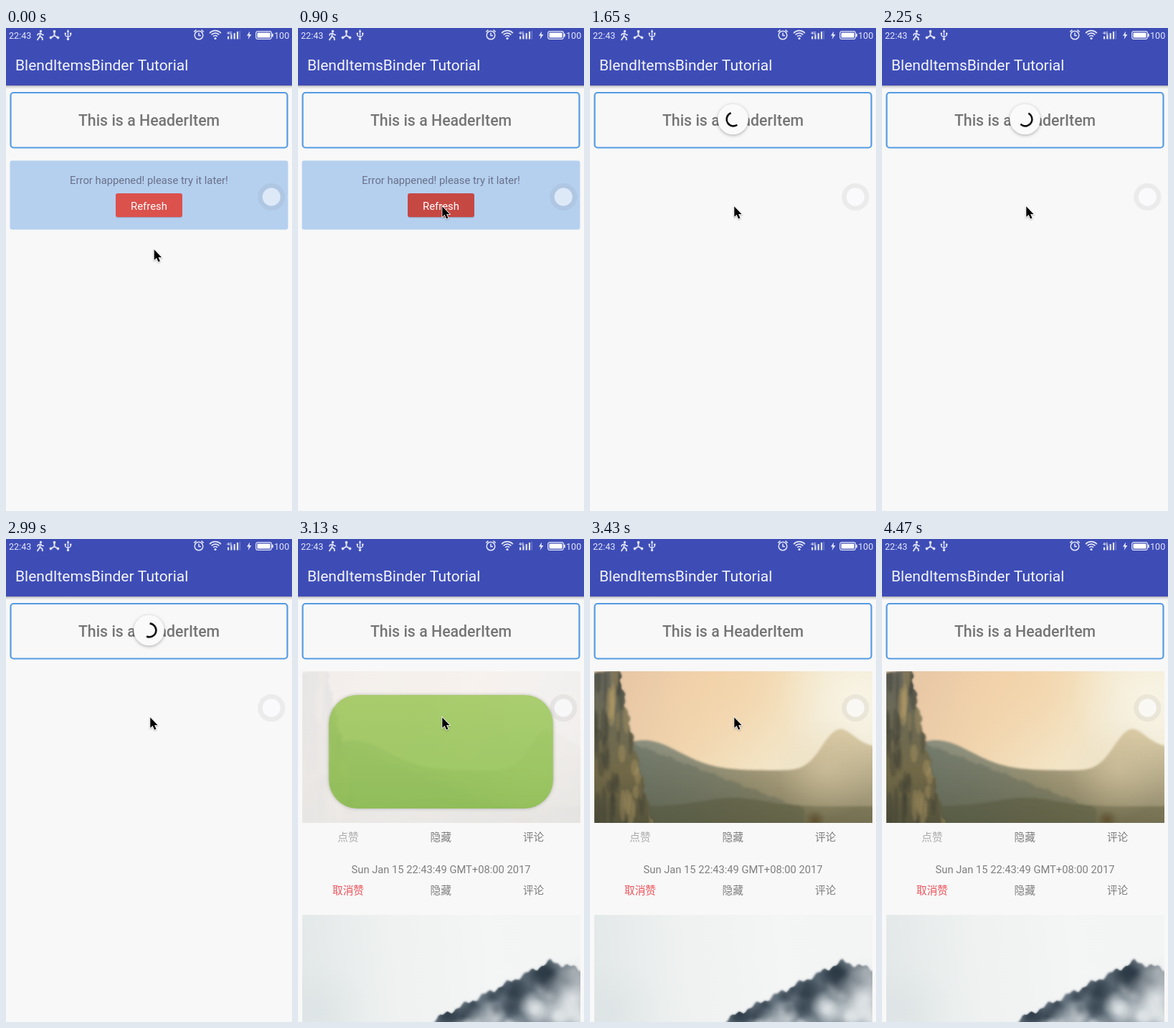
Recreate the animation shown at these times as an HTML page with a canvas. Size 399 px wide and 672 px high, loop 4920 ms.

```html
<!DOCTYPE html>
<html lang="en">
<head>
<meta charset="utf-8">
<title>List tutorial</title>
<style>
  html, body { margin: 0; width: 100%; height: 100%; overflow: hidden; background: #f8f8f8; }
  canvas { display: block; }
</style>
</head>
<body>
<canvas id="stage" width="399" height="672"></canvas>
<script>
let ctx = document.getElementById('stage').getContext('2d');
const LOOP = 4920, STEP = 149;
const ROBOTO = 'Roboto, sans-serif';
const CJK = '"Noto Sans CJK SC", "Noto Sans CJK", sans-serif';
const ICON = '#e3e6f6';

const clamp = v => Math.max(0, Math.min(1, v));
const easeInOut = v => 0.5 - Math.cos(clamp(v) * Math.PI) / 2;
const bump = (x, center, width) => Math.exp(-(((x - center) / width) ** 2));
const rough = x => 2.5 * Math.sin(x * 0.21) + 1.8 * Math.sin(x * 0.53 + 1);

// Cubic bezier (0.4, 0, 0.2, 1)
function fastOutSlowIn(x) {
  let lo = 0, hi = 1;
  for (let i = 0; i < 20; i++) {
    const s = (lo + hi) / 2, r = 1 - s;
    if (1.2 * r * r * s + 0.6 * r * s * s + s ** 3 < x) lo = s; else hi = s;
  }
  return 3 * (1 - lo) * lo * lo + lo ** 3;
}

function seeded(seed) {
  return () => (seed = (seed * 16807) % 2147483647) / 2147483647;
}

function text(str, x, y, size, color, { align = 'center', weight = 400, family = ROBOTO } = {}) {
  ctx.font = `${weight} ${size}px ${family}`;
  ctx.textAlign = align;
  ctx.fillStyle = color;
  ctx.fillText(str, x, y);
}

function rect(x, y, w, h, color, radius = 0) {
  ctx.beginPath();
  ctx.roundRect(x, y, w, h, radius);
  ctx.fillStyle = color;
  ctx.fill();
}

function frameRect(x, y, w, h, color, radius, width) {
  ctx.beginPath();
  ctx.roundRect(x, y, w, h, radius);
  ctx.lineWidth = width;
  ctx.strokeStyle = color;
  ctx.stroke();
}

function oval(x, y, rx, ry, color) {
  ctx.beginPath();
  ctx.ellipse(x, y, rx, ry, 0, 0, 7);
  ctx.fillStyle = color;
  ctx.fill();
}

const disc = (x, y, r, color) => oval(x, y, r, r, color);

function stroke(path, width = 1.5) {
  ctx.lineWidth = width;
  ctx.strokeStyle = ICON;
  ctx.stroke(new Path2D(path));
}

function arc(x, y, r, from, to, width, color = ICON) {
  ctx.beginPath();
  ctx.arc(x, y, r, from, to);
  ctx.lineWidth = width;
  ctx.strokeStyle = color;
  ctx.stroke();
}

function linear(x0, y0, x1, y1, ...colors) {
  const g = ctx.createLinearGradient(x0, y0, x1, y1);
  colors.forEach((c, i) => g.addColorStop(i / (colors.length - 1), c));
  return g;
}

function glow(x, y, r, rgb, alpha) {
  const g = ctx.createRadialGradient(x, y, 0, x, y, r);
  g.addColorStop(0, `rgba(${rgb},${alpha})`);
  g.addColorStop(1, `rgba(${rgb},0)`);
  ctx.fillStyle = g;
  ctx.fillRect(x - r, y - r, 2 * r, 2 * r);
}

// Region below the curve y = top(x)
function ridge(top, from = 0, to = 399, bottom = 680) {
  const path = new Path2D();
  path.moveTo(from, bottom);
  for (let x = from; x <= to; x += 3) path.lineTo(x, top(x));
  path.lineTo(to, bottom);
  return path;
}

function fill(path, color) {
  ctx.fillStyle = color;
  ctx.fill(path);
}

// Paints a picture once; its drawing code uses stage coordinates.
function picture(y, height, paint) {
  const canvas = document.createElement('canvas');
  canvas.width = 388;
  canvas.height = height;
  const stage = ctx;
  ctx = canvas.getContext('2d');
  ctx.translate(-5.5, -y);
  paint();
  ctx = stage;
  return alpha => {
    ctx.globalAlpha = alpha;
    ctx.drawImage(canvas, 5.5, y);
    ctx.globalAlpha = 1;
  };
}

const placeholder = picture(184, 211, () => {
  rect(0, 180, 399, 220, linear(5, 184, 394, 395, '#f4f2f1', '#f7f4f3', '#eeeded'));
  ctx.shadowColor = 'rgba(0,0,0,.25)';
  ctx.shadowBlur = 5;
  rect(43, 217, 313, 158, linear(0, 217, 0, 375, '#a4cc69', '#95c45c'), 40);
});

const valley = picture(184, 211, () => {
  const random = seeded(7);
  rect(0, 180, 399, 220, linear(60, 184, 350, 310, '#e9c8a6', '#f1d5ae', '#f3e4c4', '#efe8d4'));
  glow(210, 205, 120, '245,206,160', 0.4);
  glow(375, 225, 110, '252,249,236', 0.75);
  ctx.filter = 'blur(1.5px)';

  const hills = x => 322 - 42 * bump(x, 75, 70) - 50 * bump(x, 345, 32) - 30 * bump(x, 400, 45);
  const range = ridge(hills);
  fill(range, linear(60, 0, 394, 0, '#8d9181', '#9b9b86', '#b5aa88', '#d3c39d', '#dccda9'));
  fill(range, linear(0, 270, 0, 395, 'rgba(70,72,50,0)', 'rgba(75,76,50,.55)'));
  fill(ridge(x => 262 + x * 0.38 + rough(x) / 2, 50, 300), 'rgba(78,90,78,.32)');
  fill(ridge(x => 372 - 12 * bump(x, 200, 60)), 'rgba(82,80,52,.4)');
  glow(330, 320, 70, '235,218,180', 0.35);
  glow(314, 391, 14, '90,72,40', 0.8);

  // Cliff with weathered streaks
  const edge = y => 41 + 46 * Math.max(0, (y - 184) / 211) ** 1.1 + rough(y) * 0.7;
  const cliff = new Path2D('M0 187 L30 183');
  for (let y = 184; y < 404; y += 4) cliff.lineTo(edge(y), y);
  cliff.lineTo(0, 404);
  fill(cliff, linear(0, 184, 0, 395, '#64645a', '#6d6a54', '#716847', '#55533c'));
  ctx.clip(cliff);
  for (let i = 0; i < 46; i++) {
    const y = 184 + random() * 211, x = random() * edge(y);
    const sunny = x > edge(y) * 0.5 && random() < 0.65;
    oval(x, y, 2 + random() * 4, 8 + random() * 20, sunny ? 'rgba(176,153,101,.4)' : 'rgba(50,54,46,.32)');
  }
});

const cloudyPeak = picture(523, 149, () => {
  const random = seeded(19);
  rect(0, 518, 399, 160, linear(5, 600, 394, 560, '#e3e8e8', '#eff2f1', '#f4f5f5', '#f3f4f4'));
  glow(30, 655, 70, '216,224,226', 0.5);
  ctx.filter = 'blur(1.5px)';

  const slope = x => 588 + (x < 352 ? 0.5 : -0.25) * (352 - x) + rough(x);
  const peak = ridge(slope, 190);
  ctx.save();
  fill(peak, linear(200, 672, 394, 600, '#6b7984', '#62707c', '#56646f', '#7d8890'));
  ctx.clip(peak);
  for (let i = 0; i < 60; i++) {
    const x = 195 + random() * 200, depth = random() * 75;
    const cloudy = depth > 18 + random() * 30;
    glow(x, slope(x) + depth, 8 + random() * 14, cloudy ? '226,231,233' : '42,56,68', 0.65);
  }
  ctx.restore();
  glow(384, 640, 48, '232,236,238', 0.9);
  glow(340, 658, 34, '222,228,231', 0.75);
  glow(384, 600, 20, '238,241,242', 0.5);
});

function statusBar() {
  const left = { align: 'left' };
  text('22:43', 4, 14.5, 12.6, ICON, left);
  text('100', 374, 14.5, 12.6, ICON, left);

  // Walker
  disc(48.5, 4.4, 1.7, ICON);
  stroke('M43.5 10.5 L45 8 L48.5 7 L50.5 9.5 H53');
  stroke('M47.8 7 L47.3 11.5 L50.5 13.5 L51 17 M47.3 11.5 L43.5 17', 1.9);

  // Hub
  for (let i = 0; i < 3; i++) {
    ctx.save();
    ctx.translate(67.5, 10.5);
    ctx.rotate(i * Math.PI * 2 / 3);
    stroke('M0 0 V-6', 1.9);
    rect(-1.7, -7.5, 3.4, 3.4, ICON, 1);
    ctx.restore();
  }

  // USB
  stroke('M86.5 3 V16 M82.8 7.5 V10.5 L86.5 13 L90.2 10.5 V7.5', 1.3);
  fill(new Path2D('M84.6 5.4 L86.5 2 L88.4 5.4'), ICON);
  disc(86.5, 15.5, 1.7, ICON);
  disc(82.8, 7.8, 1.3, ICON);
  rect(89, 6.6, 2.4, 2.4, ICON);

  // Alarm
  arc(269, 10, 5.8, 0, 7, 1.5);
  stroke('M269 6.5 V10.5 H272 M262.3 5.3 L265.5 2.7 M275.7 5.3 L272.5 2.7');

  // Wi-Fi
  for (let r = 4; r < 12; r += 3.4) arc(292, 14.5, r, -Math.PI * 0.76, -Math.PI * 0.24, 1.7);
  disc(292, 14.5, 1.6, ICON);

  // Signal, charging bolt and battery
  text('4G', 308, 8.5, 6, ICON, { align: 'left', weight: 700 });
  for (let i = 0; i < 4; i++) rect(309 + i * 4.3, 11.5 - i * 2.2, 2.2, 4 + i * 2.2, ICON);
  rect(325.5, 4, 1.5, 11.5, 'rgba(227,230,246,.3)');
  fill(new Path2D('M340 4.5 L336 10.7 H338.6 L337.7 15.7 L342.4 9 H339.7'), ICON);
  frameRect(348.7, 4.7, 21.6, 10.6, ICON, 2.5, 1.2);
  rect(350.5, 6.5, 18, 7, '#fff', 1);
  rect(371, 7.5, 1.8, 5, ICON, 1);
}

function appBar() {
  rect(0, 80, 399, 5, linear(0, 80, 0, 85, 'rgba(0,0,0,.28)', 'rgba(0,0,0,.09)', 'rgba(0,0,0,0)'));
  rect(0, 0, 399, 80, '#3e4db6');
  statusBar();
  text('BlendItemsBinder Tutorial', 13, 59, 21, '#f4f5fc', { align: 'left' });
}

function header() {
  frameRect(6.5, 90, 386, 76.5, '#559be3', 4, 2.2);
  text('This is a HeaderItem', 199.5, 136, 21.3, '#757575', { weight: 500 });
}

function errorCard(alpha, pressed) {
  ctx.globalAlpha = alpha;
  rect(5.5, 184.5, 388, 96, '#b5d0ef', 3);
  text('Error happened! please try it later!', 199.5, 217, 14.8, '#697089');
  rect(153, 231, 93, 33.3, 'rgba(70,60,90,.25)', 3);
  rect(153, 230, 93, 33, pressed ? '#c64843' : '#db514c', 3);
  text('Refresh', 199.5, 252.5, 14.9, '#fff');
  ctx.globalAlpha = 1;
}

function actions(y, like, likeColor) {
  const labels = [like, '隐藏', '评论'];
  labels.forEach((label, i) =>
    text(label, 70 + i * 129.3, y, 14.7, i ? '#7d7d7d' : likeColor, { family: CJK }));
}

function list(photoAlpha) {
  placeholder(1);
  valley(photoAlpha);
  actions(419.5, '点赞', '#ababab');
  text('Sun Jan 15 22:43:49 GMT+08:00 2017', 199.5, 465, 14.7, '#7f7f7f');
  actions(493.5, '取消赞', '#ee535b');
  cloudyPeak(1);
}

function spinner(time) {
  const scale = easeInOut((time - 960) / 380);
  ctx.save();
  ctx.shadowColor = 'rgba(0,0,0,.3)';
  ctx.shadowBlur = 4;
  ctx.shadowOffsetY = 1.2;
  disc(199.5, 127, 21.3 * scale, '#fafafa');
  ctx.restore();

  const turns = (time - 1370) / 1332;
  if (turns <= 0) return;
  const part = turns % 1;
  const tail = 0.8 * fastOutSlowIn(clamp(part * 2 - 1));
  const head = 0.8 * fastOutSlowIn(clamp(part * 2)) + 0.04;
  const spin = part * 0.25 + turns * 0.6 - 0.017;
  const angle = v => (v + spin) * Math.PI * 2;
  arc(200, 127, 9.4, angle(tail), angle(head), 2.6, '#111');
}

function floatingButton() {
  arc(370.3, 235, 15.8, 0, 7, 6.6, 'rgba(128,128,128,.11)');
  disc(370.3, 235, 12.5, 'rgba(252,252,255,.58)');
}

const ARROW = new Path2D('M0 0 V14.4 L3.3 11.4 L5.8 17 L8.2 16 L5.8 10.6 H10.3 Z');

function pointer(frame) {
  if (frame > 29) return;
  const away = 1 - easeInOut(frame / 3);
  const leave = Math.max(0, (frame - 26) / 3) ** 2;
  ctx.save();
  ctx.translate(201.3 + 5.4 * away + 137 * leave, 248.3 + 60 * away + 357 * leave);
  ctx.shadowColor = 'rgba(0,0,0,.3)';
  ctx.shadowBlur = 2;
  ctx.shadowOffsetY = 1;
  ctx.lineWidth = 1.6;
  ctx.strokeStyle = '#fff';
  ctx.stroke(ARROW);
  ctx.shadowColor = 'transparent';
  fill(ARROW, '#000');
  ctx.restore();
}

function draw(now) {
  const frame = Math.floor((now % LOOP + 2) / STEP);
  const time = frame * STEP;
  const loaded = time > 3110;
  rect(0, 0, 399, 672, '#f8f8f8');
  appBar();
  header();
  errorCard(clamp((1140 - time) / 240), time > 880);
  if (loaded) list(clamp((time - 3110) / 270));
  else if (time > 960) spinner(time);
  floatingButton();
  pointer(frame);
}

const start = performance.now();
function tick() {
  draw(performance.now() - start);
  requestAnimationFrame(tick);
}
tick();
</script>
</body>
</html>
```
